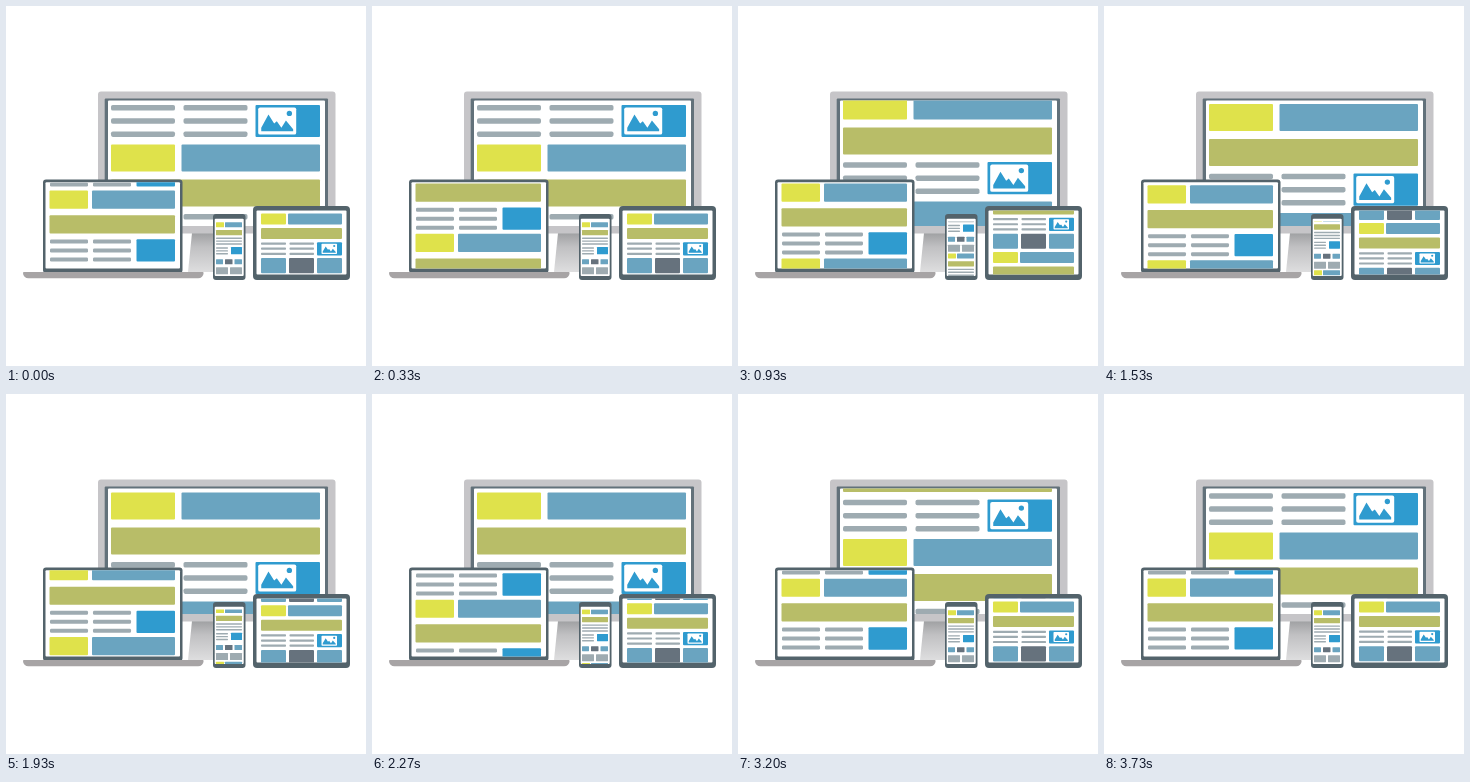
Animation of 360x360 px, one loop 4070 ms. Source, as an HTML page with a canvas:

```html
<!DOCTYPE html>
<html lang="en">
<head>
<meta charset="utf-8">
<title>Responsive layouts</title>
<style>
html, body { margin: 0; height: 100%; overflow: hidden; background: #fff; }
canvas { display: block; width: 100vw; height: 100vh; }
</style>
</head>
<body>
<canvas width="360" height="360"></canvas>
<script>
const ctx = document.querySelector('canvas').getContext('2d');
const LOOP = 4070, FPS = 15, LAST_STEP = 56;
const YELLOW = '#dfe24b', BLUE = '#6aa4c0', OLIVE = '#b8bd68', SKY = '#2f9bcf';
const LINE = '#9eabb1', SLATE = '#66727d', FRAME = '#53636b';

// Boxes are given by their edges: left, top, right, bottom.
function box(color, x1, y1, x2, y2, r = 1) {
  ctx.fillStyle = color;
  ctx.beginPath();
  ctx.roundRect(x1, y1, x2 - x1, y2 - y1, r);
  ctx.fill();
}

function shape(color, points) {
  ctx.fillStyle = color;
  ctx.beginPath();
  points.forEach(([x, y]) => ctx.lineTo(x, y));
  ctx.fill();
}

function lines(columns, y, gap, height) {
  for (const [x1, x2] of columns)
    for (let i = 0; i < 3; i++)
      box(LINE, x1, y + i * gap, x2, y + i * gap + height, height / 3);
}

function picture(x1, y1, x2, y2) {
  const w = x2 - x1, h = y2 - y1;
  const peaks = [[.08, .88], [.08, .75], [.27, .26], [.42, .59], [.49, .51], [.61, .75],
                 [.73, .48], [.92, .8], [.92, .88]];
  box('#fff', x1, y1, x2, y2, w / 20);
  shape(SKY, peaks.map(([x, y]) => [x1 + x * w, y1 + y * h]));
  ctx.beginPath();
  ctx.arc(x1 + .82 * w, y1 + .22 * h, w * .07, 0, 7);
  ctx.fill();
}

const pages = {
  monitor(y) {
    box(YELLOW, 105, y, 169, y + 27);
    box(BLUE, 175.5, y, 314, y + 27);
    box(OLIVE, 105, y + 35, 314, y + 62);
    lines([[105, 169], [177.5, 241.5]], y + 69.6, 13.2, 5.5);
    box(SKY, 249.5, y + 69.5, 314, y + 101.7);
    picture(252.2, y + 72, 290.2, y + 99.2);
  },
  laptop(y) {
    box(YELLOW, 43.5, y, 82, y + 18.2);
    box(BLUE, 86, y, 169, y + 18.2);
    box(OLIVE, 43.5, y + 24.7, 169, y + 42.9);
    lines([[44, 82], [87, 125]], y + 48.9, 9, 4);
    box(SKY, 130.5, y + 48.7, 169, y + 71);
  },
  phone(y) {
    box(YELLOW, 210, y, 218, y + 5, .4);
    box(BLUE, 219, y, 236, y + 5, .4);
    box(OLIVE, 210, y + 7.7, 236, y + 13, .4);
    lines([[210, 236]], y + 15.2, 2.9, 1.4);
    lines([[210, 222]], y + 25, 2.9, 1.4);
    box(SKY, 225, y + 24.7, 236, y + 32, .4);
    [[210, 217], [219, 226.5], [228.5, 236]].forEach(([a, b], i) =>
      box(i === 1 ? SLATE : BLUE, a, y + 37, b, y + 42, .4));
    box(LINE, 210, y + 45, 222, y + 52, .4);
    box(LINE, 224, y + 45, 236, y + 52, .4);
  },
  tablet(y) {
    box(YELLOW, 255, y, 280, y + 11);
    box(BLUE, 282, y, 336, y + 11);
    box(OLIVE, 255, y + 14.5, 336, y + 25.5);
    lines([[255, 280], [283.5, 308]], y + 29.1, 5.1, 2.2);
    box(SKY, 311, y + 28.8, 336, y + 42);
    picture(315.5, y + 30.4, 331, y + 40.5);
    [255, 283, 311].forEach((x, i) => box(i === 1 ? SLATE : BLUE, x, y + 44.7, x + 25, y + 59.8));
  }
};

// The last copy of the page sits at top; earlier copies stack above it.
function scrollPage(page, [x1, y1, x2, y2], top, period, headroom = 0) {
  box('#fff', x1, y1, x2, y2);
  ctx.save();
  ctx.beginPath();
  ctx.rect(x1, y1 + headroom, x2 - x1, y2 - y1 - headroom);
  ctx.clip();
  for (let i = 0; i < 3; i++) page(top - i * period);
  ctx.restore();
}

function easeOut(t, start, duration) {
  const p = Math.min(1, Math.max(0, (t - start) / duration));
  return 1 - (1 - p) ** 4;
}

const glide = (t, start) => 1 - Math.exp(-.0023 * Math.max(0, t - start));

function draw(t) {
  const thereAndBack = (out, back) => easeOut(t, out, 1550) - easeOut(t, back, 1550);
  ctx.clearRect(0, 0, 360, 360);

  const shade = ctx.createLinearGradient(0, 227, 0, 266);
  shade.addColorStop(0, '#9fa0a2');
  shade.addColorStop(.35, '#c0c0c2');
  shade.addColorStop(1, '#dededf');
  shape(shade, [[186, 227], [235, 227], [239, 266], [182, 266]]);
  box('#c6c5c8', 92, 85.5, 329.5, 227.5, 3);
  box('#62717a', 98.7, 92.6, 322, 220, 1);
  scrollPage(pages.monitor, [102, 94.6, 319, 220], 138.4 + 69 * thereAndBack(380, 2515), 109);

  box(FRAME, 37, 173.5, 176.5, 267, 3);
  scrollPage(pages.laptop, [39.5, 176.3, 174, 262.5], 184.6 + 69.7 * thereAndBack(0, 1866), 75);
  box('#a7a4a5', 17, 266, 197.6, 272.3, [1, 1, 6, 6]);

  box(FRAME, 207, 208, 239.5, 274, 3);
  scrollPage(pages.phone, [208.7, 212.8, 237.7, 270], 216.3 + 53.7 * glide(t, 555), 53.7, 2.7);

  box(FRAME, 247, 200, 344, 274, 4);
  scrollPage(pages.tablet, [250.5, 204.5, 340.5, 268.5], 270.4 - 63 * glide(t, 720), 63);
}

function tick(now) {
  const step = Math.floor(now % LOOP * FPS / 1000 + .06);
  // The pages rest at the end of the loop before it starts over.
  draw(Math.min(step, LAST_STEP) * 1000 / FPS);
  requestAnimationFrame(tick);
}
requestAnimationFrame(tick);
</script>
</body>
</html>
```
